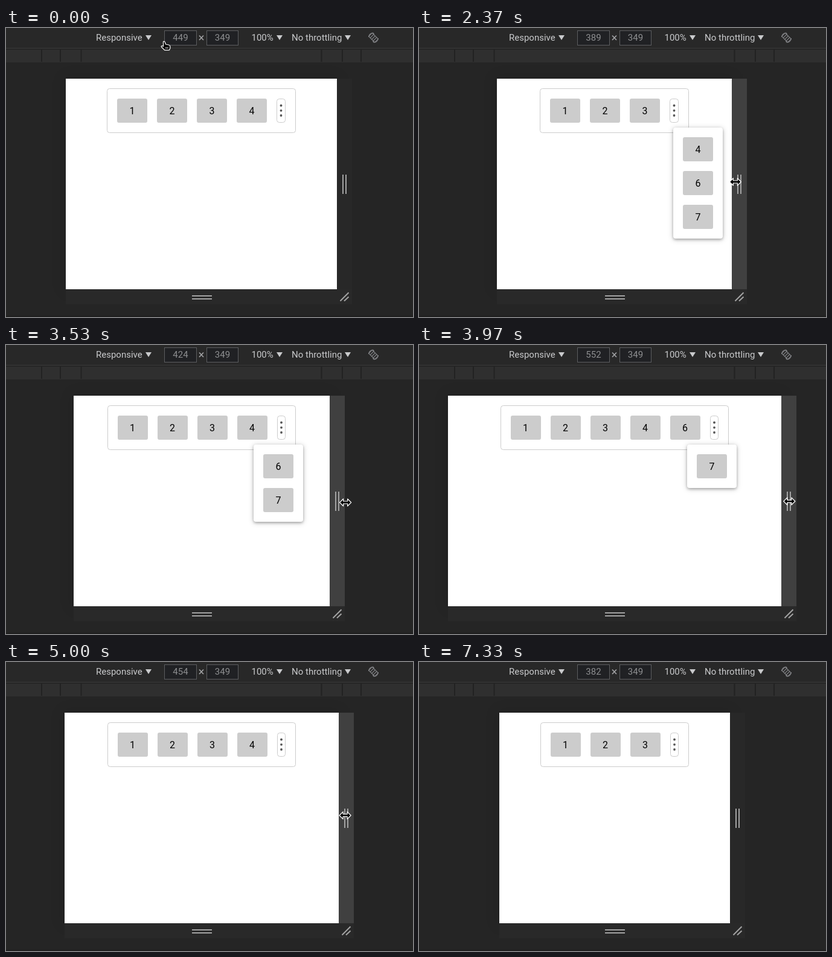
These frames come from a looping animation (674 px wide and 479 px high, 7630 ms). An HTML page:

```html
<!DOCTYPE html>
<html lang="en">
<head>
<meta charset="utf-8">
<title>Responsive toolbar</title>
<style>
html, body { margin: 0; width: 100%; height: 100%; overflow: hidden; background: #252525; }
svg { display: block; }
text { font-family: Roboto, Arial, sans-serif; }
.bar text { font-size: 15px; fill: #c9cacc; }
.bar .size { fill: #8e8f91; text-anchor: middle; }
.grip { stroke: #a3a3a3; stroke-width: 2; fill: none; }
.item { fill: #ccc; }
.label { font-size: 16px; text-anchor: middle; fill: #000; }
.outline { fill: #fff; stroke: #ccc; }
.page { fill: #fff; filter: drop-shadow(0 0 11px rgba(0,0,0,.14)); }
.popup { fill: #fff; filter: drop-shadow(0 2px 2px rgba(0,0,0,.24)) drop-shadow(0 1px 4px rgba(0,0,0,.22)); }
.pointer { fill: #000; stroke: #fff; stroke-width: 1.2; stroke-linejoin: round; }
</style>
</head>
<body>
<svg width="674" height="479" viewBox="0 0 674 479">
  <rect width="674" height="479" fill="#252525"/>
  <g class="bar">
    <rect width="674" height="33" fill="#282828"/>
    <rect y="33" width="674" height="1" fill="#3b3b3b"/>
    <rect y="36" width="674" height="21" fill="#2f2f2f"/>
    <path d="M59 36v20M90 36v20M124.500 36v20M522.500 36v20M557 36v20M588 36v20" stroke="#222" stroke-width="2"/>
    <rect y="477" width="674" height="2" fill="#1e1e1e"/>
    <text x="149" y="21">Responsive</text>
    <text x="406.500" y="21">100%</text>
    <text x="473" y="21">No throttling</text>
    <path d="M231 12h10l-5 8zM448 12h10l-5 8zM561 12h10l-5 8z" fill="#c9cacc"/>
    <g fill="#202124" stroke="#5c5d60">
      <rect x="262.500" y="4.500" width="53" height="24"/>
      <rect x="332.500" y="4.500" width="52" height="24"/>
    </g>
    <text class="size" id="width" x="289" y="21"></text>
    <text class="size" x="358.500" y="21">349</text>
    <path d="M320 12.500l7 7.500M327 12.500l-7 7.500" stroke="#a2a3a5" stroke-width="1.700"/>
    <g transform="translate(608.500 16)" fill="none" stroke="#85868a" stroke-width="1.200">
      <g transform="rotate(-45)">
        <rect x="-4" y="-7" width="8" height="14" rx="1"/>
        <path d="M-4-3.500h8M-4 0h8M-4 3.500h8"/>
      </g>
      <path d="M-8-1A8 8 0 0 1-1-8M8 1A8 8 0 0 1 1 8M-1-8l2 2M1 8l-2-2"/>
    </g>
  </g>
  <g id="scene"></g>
</svg>
<script>
const LOOP = 7630, CENTER = 323.5, STEP = 1000 / 30;
const ITEMS = [1, 2, 3, 4, 6, 7];
const scene = document.getElementById('scene');
const widthLabel = document.getElementById('width');

// [time, page width]
const widths = [
  [1970, 449], [2200, 432], [2337, 401], [2370, 389], [2670, 301], [2770, 283],
  [3330, 283], [3497, 412], [3530, 424], [4070, 581], [4200, 601],
  [4400, 601], [4500, 549], [5130, 429], [5170, 429], [5500, 389], [5630, 382]
];
// [time, pointer x, pointer y]
const moves = [
  [0, 262, 22], [30, 262, 23], [500, 457, 143], [970, 457, 143], [1330, 535.5, 233.5],
  [1430, 555, 255], [1970, 554, 255], [2337, 530, 255], [2370, 524, 255],
  [2670, 480, 257], [2770, 474, 257], [3170, 478, 258], [3330, 478, 260],
  [3530, 562, 261], [4200, 640, 258], [4400, 640, 255], [4500, 599, 255],
  [5130, 552, 254], [5500, 532, 254], [5630, 528, 254], [5900, 528, 254],
  [6070, 563, 401], [6700, 563, 401], [7330, 45, -20]
];

function at(keys, t, i = 1) {
  const next = keys.findIndex(k => k[0] > t);
  if (next === 0) return keys[0][i];
  if (next < 0) return keys[keys.length - 1][i];
  const a = keys[next - 1], b = keys[next];
  return a[i] + (b[i] - a[i]) * (t - a[0]) / (b[0] - a[0]);
}

const pageWidth = t => Math.round(at(widths, t));
const pageLeft = w => Math.round(CENTER - w / 2);
const isFull = n => n === ITEMS.length;
const barWidth = n => isFull(n) ? 66 * n + 18 : 66 * n + 49;

function visibleCount(w) {
  let n = ITEMS.length;
  while (n > 1 && 66 * n + 49 > w * 0.8) n--;
  return n;
}

function rect(x, y, w, h, r, attrs) {
  return `<rect x="${x}" y="${y}" width="${w}" height="${h}" rx="${r}" ${attrs}/>`;
}

function item(n, x, y, textX = x + 25) {
  return rect(x, y, 50, 40, 3, 'class="item"') +
    `<text class="label" x="${textX}" y="${y + 26}">${n}</text>`;
}

function frame(left, w, active) {
  const r = left + w;
  return rect(left, 84, w, 349, 0, 'class="page"') +
    rect(r, 84, 25, 349, 0, `fill="${active ? '#404040' : '#282828'}"`) +
    rect(left, 433, w + 25, 25, 0, 'fill="#292929"') +
    `<path class="grip" d="M${r + 10} 243v32m5 0v-32M308 444h33m0 5h-33
      M${r + 5.5} 452.5l14-14M${r + 12} 452.5l7.500-7"/>`;
}

function toolbar(left, w, n) {
  const exact = left + (w - barWidth(n)) / 2;
  const x = Math.ceil(exact), end = Math.floor(exact + barWidth(n));
  let out = rect(x + 0.5, 100.5, end - x - 1, 73, 4, 'class="outline"');
  for (let i = 0; i < n; i++) out += item(ITEMS[i], x + 17 + 66 * i, 117, exact + 42 + 66 * i);
  if (!isFull(n)) {
    const bx = x + 17 + 66 * n, bw = end - 17 - bx;
    out += rect(bx + 0.5, 117.5, bw - 1, 39, 4, 'class="outline"');
    for (const y of [128.5, 136.8, 145])
      out += `<circle cx="${bx + bw / 2}" cy="${y}" r="1.900" fill="#555"/>`;
  }
  return out;
}

// The popup trails the resize by one step.
function popup(left, n, lateWidth) {
  const rest = ITEMS.slice(n);
  const offset = lateWidth / 2 + barWidth(visibleCount(lateWidth)) / 2 - 24;
  const x = Math.round(left + offset - 41);
  return rect(x, 165, 82, 16 + 56 * rest.length, 4, 'class="popup"') +
    rest.map((v, i) => item(v, x + 16, 181 + 56 * i)).join('');
}

const shapes = {
  resize: '<path class="pointer" d="M-9.500 0l6-6v4h7v-4l6 6-6 6v-4h-7v4z"/>',
  arrow: '<path class="pointer" d="M0 0v15l3.500-3.300 2.300 5 2.500-1.100-2.300-4.900h4.800z"/>',
  hand: '<path class="pointer" d="M-1.500 0.500q1.500-1 2.500 .5l1.500 4 5 1q2.300 .6 2.300 2.500v3l-1.300 3h-8l-5-5q-1-2 1-2l2 1z"/>' +
    '<path d="M1.500 11h5.500" stroke="#fff"/>',
  touch: '<circle r="9" fill="#929292" stroke="#858585"/>'
};

function pointer(t, left, w, active) {
  const x = at(moves, t, 1), y = at(moves, t, 2);
  const onPage = x > left && x < left + w && y > 84 && y < 433;
  const shape = active ? 'resize' : onPage ? 'touch' : y < 33 && x > 149 && x < 571 ? 'hand' : 'arrow';
  return `<g transform="translate(${x} ${y})">${shapes[shape]}</g>`;
}

function draw(t) {
  const w = pageWidth(t), left = pageLeft(w), n = visibleCount(w);
  const active = t >= 1395 && t < 5965;
  const open = t >= 970 && t < 4200 && !isFull(n);
  widthLabel.textContent = w;
  scene.innerHTML = frame(left, w, active) + toolbar(left, w, n) +
    (open ? popup(left, n, pageWidth(t - STEP)) : '') + pointer(t, left, w, active);
}

function tick() {
  draw(performance.now() % LOOP);
  requestAnimationFrame(tick);
}
tick();
</script>
</body>
</html>
```
